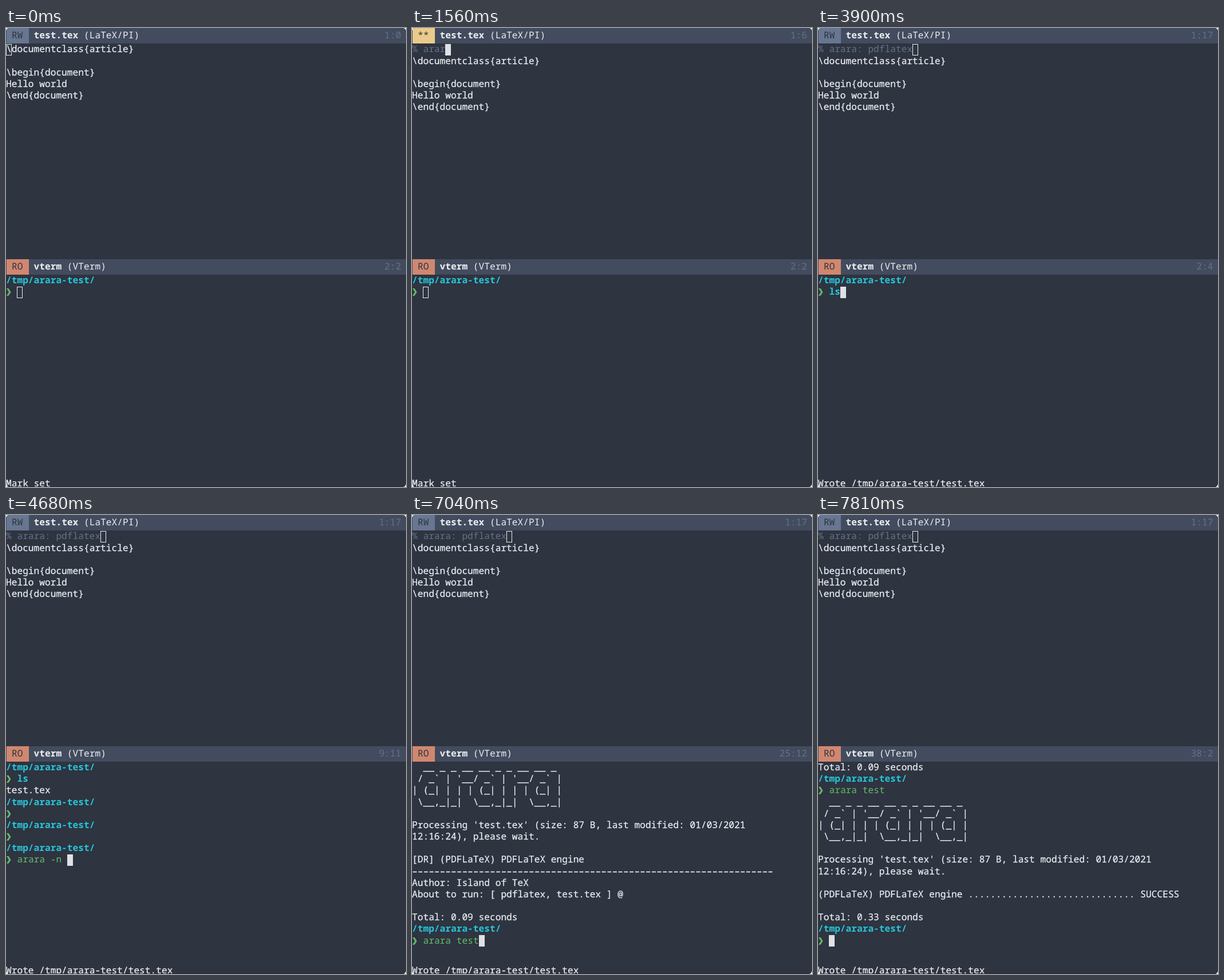
Animation, 699 px wide and 802 px high, one loop 8000 ms. Source, as an HTML page:

```html
<!DOCTYPE html>
<html lang="en">
<head>
<meta charset="utf-8">
<title>Editor and terminal</title>
<style>
  :root { --w: 9.72px; --h: 20.17px; }
  html, body { margin: 0; width: 100%; height: 100%; overflow: hidden; background: #fff; }
  #stage {
    position: relative; width: 699px; height: 802px; overflow: hidden;
    background: #2e3440; color: #eceff4; border-radius: 6px;
    font: 500 16.2px/var(--h) "Noto Sans Mono", "DejaVu Sans Mono", monospace;
    text-rendering: geometricPrecision; font-variant-ligatures: none; white-space: pre;
  }
  #stage::after {
    content: ""; position: absolute; left: 0; right: 0; bottom: 0; height: 1px; background: #2b2a3a;
  }
  .bar { position: absolute; left: 0; width: 699px; height: 27px; line-height: 24px; background: #434c5e; }
  .bar > * { position: absolute; top: 0; }
  .badge { left: 1px; width: 39px; height: 27px; text-indent: 9px; font-weight: 300; color: #2e3440; }
  .RW { background: #677691; }
  .RO { background: #d08770; }
  .edit { background: #ebcb8b; }
  .name { left: calc(var(--w) * 5); font-weight: 300; }
  .pos { right: 8.5px; font-weight: 300; color: #637189; }
  .pane { position: absolute; left: 0; width: 699px; }
  .line { position: absolute; left: 0; height: var(--h); margin-top: -1px; }
  .line, #echo { -webkit-text-stroke: .25px; }
  .dim, .cyan, .green { -webkit-text-stroke: 0; }
  .dim { color: #637189; font-weight: 300; }
  .cyan { color: #26c6da; font-weight: 700; }
  .green { color: #66bb6a; }
  .mark { color: #66bb6a; font: 700 16.2px/var(--h) "DejaVu Sans Mono", monospace; -webkit-text-stroke: .8px; }
  .cursor {
    position: absolute; box-sizing: border-box; width: 10px; height: 20px;
    border: 1px solid #eceff4; color: #2e3440; line-height: 18px; text-indent: -1px;
  }
  .solid { background: #dfe1e5; border-color: #dfe1e5; }
  #echo { position: absolute; left: 0; top: 785px; }
</style>
</head>
<body>
<div id="stage">
  <div class="bar" style="top:0"><span id="mode" class="badge RW">RW</span><span class="name"><b>test.tex</b> (LaTeX/PI)</span><span id="topPos" class="pos"></span></div>
  <div id="top" class="pane" style="top:27.4px"></div>
  <div class="bar" style="top:403.5px"><span class="badge RO">RO</span><span class="name"><b>vterm</b> (VTerm)</span><span id="termPos" class="pos"></span></div>
  <div id="term" class="pane" style="top:431px"></div>
  <div id="echo"></div>
</div>
<script>
const LOOP = 8000, CELL = 9.72, ROW = 20.17, TERM_ROWS = 16;
const FOCUSED = 250, OPENED = 520, SAVED = 3380, SWITCHED = 3640;
const $ = id => document.getElementById(id);

const directive = "% arara: pdflatex";
const doc = ["\\documentclass{article}", "", "\\begin{document}", "Hello world", "\\end{document}"];

const path = "/tmp/arara-test/", prompt = "❯ ";
const banner = [
  "  __ _ _ __ __ _ _ __ __ _",
  " / _` | '__/ _` | '__/ _` |",
  "| (_| | | | (_| | | | (_| |",
  " \\__,_|_|  \\__,_|_|  \\__,_|",
  "",
  "Processing 'test.tex' (size: 87 B, last modified: 01/03/2021",
  "12:16:24), please wait.",
  ""
];
const log = [
  path, prompt + "ls", "test.tex",
  path, prompt, path, prompt,
  path, prompt + "arara -n test",
  ...banner,
  "[DR] (PDFLaTeX) PDFLaTeX engine",
  "–".repeat(65),
  "Author: Island of TeX",
  "About to run: [ pdflatex, test.tex ] @",
  "", "Total: 0.09 seconds",
  path, prompt + "arara test",
  ...banner,
  "(PDFLaTeX) PDFLaTeX engine " + ".".repeat(30) + " SUCCESS",
  "", "Total: 0.33 seconds",
  path, prompt
];

// [ms, characters typed in the editor]
const typing = [[0, 0], [780, 1], [1040, 2], [1300, 4], [1560, 6], [1820, 8],
  [2080, 9], [2340, 11], [2600, 13], [2860, 15], [3120, 17]];

// [ms, terminal line, column]
const shell = [[0, 2, 2], [3900, 2, 4], [4160, 9, 2], [4420, 9, 6], [4680, 9, 11], [4940, 9, 15],
  [5200, 10, 0], [5470, 25, 2], [5720, 25, 4], [5980, 25, 6], [6240, 25, 8],
  [6510, 25, 10], [6770, 25, 11], [7040, 25, 12],
  [7300, 26, 0], [7550, 34, 27], [7810, 38, 2]];

const at = (steps, t) => steps.filter(s => s[0] <= t).pop();
const span = (cls, text) => `<span class="${cls}">${text}</span>`;
const line = (html, row) => `<div class="line" style="top:${row * ROW}px">${html}</div>`;
const cursor = (row, col, solid, char = "") =>
  `<div class="cursor${solid ? " solid" : ""}" style="left:${col * CELL}px;top:${row * ROW + .4}px">${solid ? char : ""}</div>`;

function paint(text) {
  if (text === path) return span("cyan", text);
  if (!text.startsWith("❯")) return text;
  const cmd = text.slice(2);
  return span("mark", "❯") + " " + span(cmd === "ls" ? "cyan" : "green", cmd);
}

function drawEditor(t) {
  const typed = at(typing, t)[1], opened = t >= OPENED;
  const edited = opened && t < SAVED;
  const rows = opened ? [span("dim", directive.slice(0, typed)), ...doc] : doc;
  $("mode").className = "badge " + (edited ? "edit" : "RW");
  $("mode").textContent = edited ? "**" : "RW";
  $("topPos").textContent = "1:" + typed;
  $("top").innerHTML = rows.map(line).join("") +
    cursor(0, typed, t >= FOCUSED && t < SWITCHED, opened ? "" : "\\");
  $("echo").textContent = t < SAVED ? "Mark set" : "Wrote /tmp/arara-test/test.tex";
}

function drawTerminal(t) {
  const [, last, col] = at(shell, t);
  const rows = log.slice(Math.max(0, last - TERM_ROWS), last);
  rows.push(rows.pop().slice(0, col));
  $("termPos").textContent = last + ":" + col;
  $("term").innerHTML = rows.map((s, i) => line(paint(s), i)).join("") +
    cursor(rows.length - 1, col, t >= SWITCHED);
}

const changes = [FOCUSED, OPENED, SAVED, SWITCHED, ...typing.map(s => s[0]), ...shell.map(s => s[0])]
  .sort((a, b) => a - b);
const start = performance.now();
let shown = -1;

function frame() {
  const t = (performance.now() - start) % LOOP;
  const step = changes.filter(c => c <= t).pop();
  if (step !== shown) {
    shown = step;
    drawEditor(step);
    drawTerminal(step);
  }
  requestAnimationFrame(frame);
}
frame();
</script>
</body>
</html>
```
